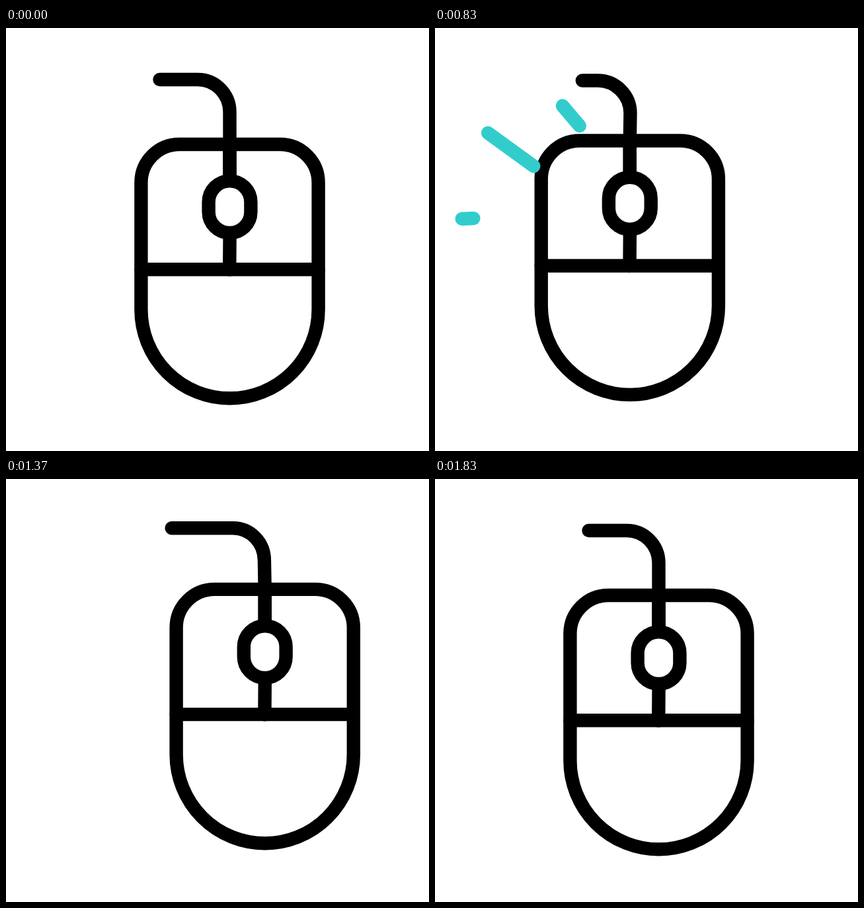
An HTML page with a canvas that plays this animation: 640 by 640 pixels, repeating every 2500 ms.

```html
<!DOCTYPE html>
<html lang="en">
<head>
<meta charset="utf-8">
<title>Mouse click</title>
<style>
  html, body { margin: 0; width: 100%; height: 100%; overflow: hidden; background: #fff; }
  canvas { display: block; width: 100vmin; height: 100vmin; }
</style>
</head>
<body>
<canvas id="stage" width="640" height="640"></canvas>
<script>
const ctx = document.getElementById('stage').getContext('2d');
const LOOP = 2500, FPS = 0.03, CYAN = '#33cccc';

// Key poses: body offset and position of the loose cable end
const rest = { dx: 0, dy: 0, endX: 232.5, endY: 78 };
const poses = [
  { at: 433, ...rest },
  { at: 720, dx: -43, dy: -29, endX: 224.3, endY: 72.3 },
  { at: 833, dx: -43.7, dy: -5.5, endX: 222.8, endY: 79.5 },
  { at: 1133, dx: -1, dy: 47, endX: 231.6, endY: 100.7 },
  { at: 1400, dx: 55, dy: -11.6, endX: 251.3, endY: 73.1 },
  { at: 1633, dx: 15.5, dy: -5, endX: 233.5, endY: 76.2 },
  { at: 1833, ...rest }
];

// Rays grow from (x, y) by (w, h); the tail then catches up with the head
const rays = [
  { x: 183, y: 290, w: -109, h: 4.6, grow: 550, shrink: 633 },
  { x: 193, y: 214.5, w: -84, h: -61, grow: 650, shrink: 833 },
  { x: 262.5, y: 153.5, w: -35, h: -41, grow: 700, shrink: 833 }
];

function smooth(t, from, to) {
  const u = Math.min(1, Math.max(0, (t - from) / (to - from)));
  return u * u * (3 - 2 * u);
}

const rate = (i, key) => (poses[i + 1][key] - poses[i][key]) / (poses[i + 1].at - poses[i].at);

function slope(i, key) {
  if (i === 0 || i === poses.length - 1) return 0;
  const a = rate(i - 1, key), b = rate(i, key);
  return a * b > 0 ? 2 * a * b / (a + b) : 0;
}

// Monotone cubic through the poses
function value(t, key) {
  const i = poses.findIndex(p => p.at > t) - 1;
  if (i < 0) return rest[key];
  const p = poses[i], q = poses[i + 1], h = q.at - p.at;
  const u = (t - p.at) / h, v = 1 - u;
  return p[key] + (q[key] - p[key]) * smooth(u, 0, 1)
    + h * u * v * (v * slope(i, key) - u * slope(i + 1, key));
}

function line(x1, y1, x2, y2) {
  ctx.beginPath();
  ctx.moveTo(x1, y1);
  ctx.lineTo(x2, y2);
  ctx.stroke();
}

const body = new Path2D('M204.4 426V234A58 58 0 0 1 262.4 176H414.6A58 58 0 0 1 472.6 234V426A134.1 134.3 0 0 1 204.4 426Z');
const button = new Path2D('M338.5 365H204.4V234A58 58 0 0 1 262.4 176H338.5Z');
const wheel = new Path2D('M306.6 263.2a31.9 31.9 0 0 1 63.8 0v15a31.9 31.9 0 0 1-63.8 0Z');

function drawCable(dx, dy, endX, endY) {
  const x = 338.5 + dx, bend = x - dx * 0.015;
  ctx.beginPath();
  ctx.moveTo(endX, endY);
  ctx.lineTo(x - 48.5, endY);
  ctx.bezierCurveTo(x - 21.7, endY, bend, endY + 22, bend, endY + 49);
  ctx.lineTo(x, 176 + dy);
  ctx.lineTo(x, 230 + dy);
  ctx.stroke();
}

function drawRay({ x, y, w, h, grow, shrink }, t) {
  const head = smooth(t, grow, 900), tail = smooth(t, shrink, 933);
  if (head > tail) line(x + w * tail, y + h * tail, x + w * head, y + h * head);
}

function draw(t) {
  const [dx, dy, endX, endY] = ['dx', 'dy', 'endX', 'endY'].map(key => value(t, key));
  ctx.fillStyle = '#fff';
  ctx.fillRect(0, 0, 640, 640);
  ctx.lineWidth = 20.4;
  ctx.lineCap = ctx.lineJoin = 'round';
  ctx.strokeStyle = '#000';
  drawCable(dx, dy, endX, endY);

  ctx.save();
  ctx.translate(dx, dy);
  if (t > 560 && t < 730) {
    ctx.fillStyle = CYAN;
    ctx.fill(button);
  }
  ctx.stroke(body);
  line(204.4, 365.2, 472.6, 365.2);
  line(338.5, 176, 338.5, 230);
  line(338.6, 312, 338.2, 365.5);
  ctx.fillStyle = '#fff';
  ctx.fill(wheel);
  ctx.stroke(wheel);
  ctx.strokeStyle = CYAN;
  rays.forEach(ray => drawRay(ray, t));
  ctx.restore();
}

function tick() {
  const t = performance.now() % LOOP;
  draw(Math.floor(t * FPS + 0.15) / FPS);
  requestAnimationFrame(tick);
}
tick();
</script>
</body>
</html>
```
